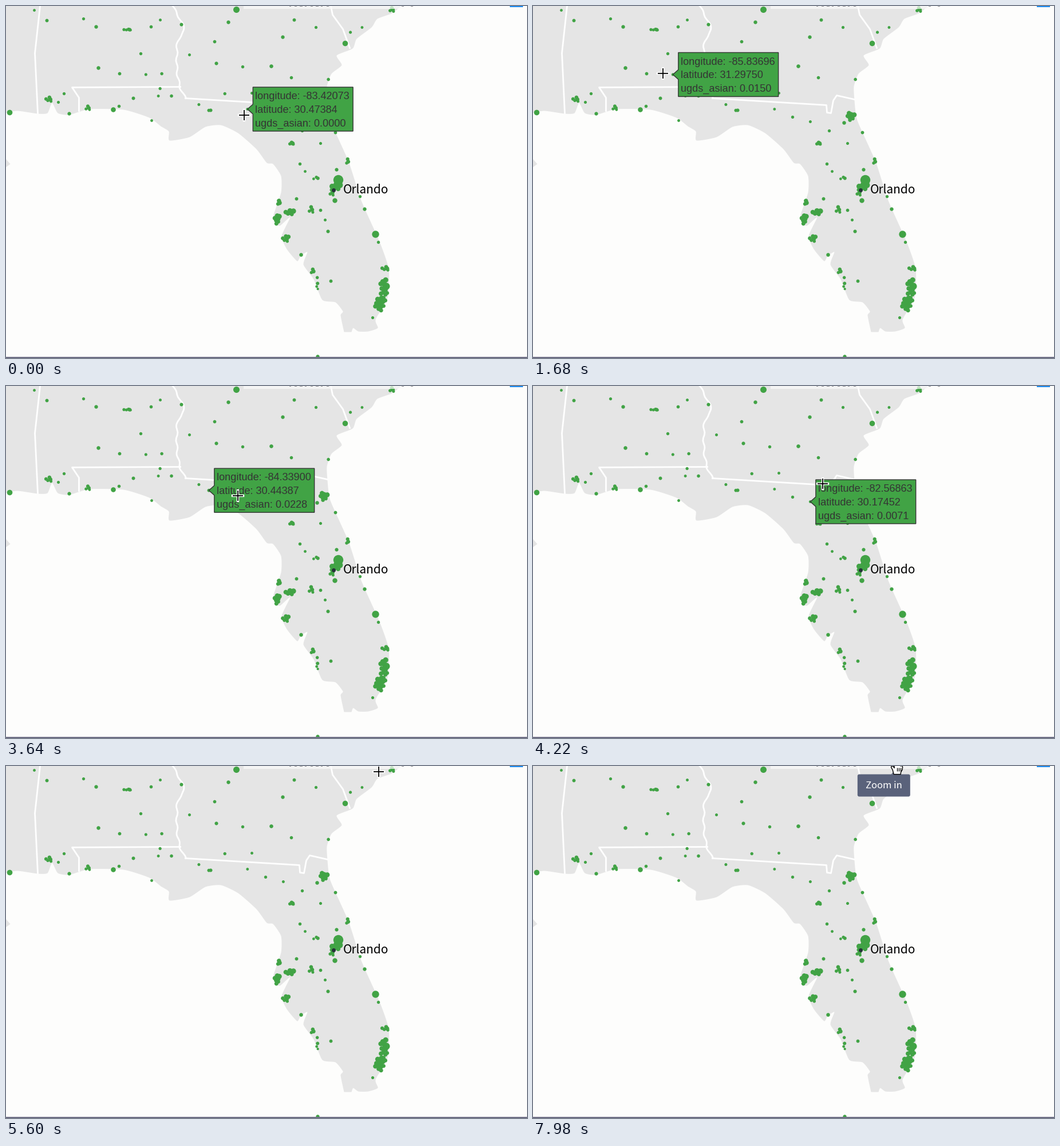
These frames come from a looping animation (910x616 px, 8000 ms). A matplotlib script:

```python
import numpy as np
import matplotlib.pyplot as plt
from matplotlib.animation import FuncAnimation
from matplotlib.patches import FancyBboxPatch, Polygon, Rectangle

W, H, DPI = 910, 616, 100
LOOP, STEP = 8000, 40
PT = 72 / DPI  # points per pixel
GOLDEN = 0.618034

PAPER, LAND = "#fdfdfc", "#e5e5e5"
GREEN, INK, SLATE = "#41a345", "#343434", "#5a627b"
SANS, HUMANIST = "Liberation Sans", "Noto Sans CJK JP"

GULF = [
    (0, 186), (20, 183), (55, 188), (72, 187), (80, 169), (90, 187), (110, 190),
    (145, 180), (205, 181), (250, 195), (270, 210), (284, 219), (285, 235),
    (320, 229), (348, 211), (375, 208), (405, 222), (437, 250), (455, 274),
    (466, 276), (480, 297), (480, 326), (467, 365), (470, 379), (478, 384),
    (496, 369), (481, 402), (490, 425), (508, 446), (514, 437), (526, 430),
    (519, 452), (537, 478), (552, 514), (575, 518), (588, 534), (584, 541),
    (590, 570),
]
ATLANTIC = [
    (603, 570), (606, 563), (615, 569), (632, 569), (649, 563), (645, 548),
    (666, 510), (668, 460), (652, 412), (620, 340), (598, 272), (566, 200),
    (561, 165), (560, 140), (568, 118), (586, 103), (577, 86), (605, 74),
    (612, 57), (638, 37), (648, 22), (672, 13), (690, 0),
]
RIVER = [(291, 0), (311, 40), (299, 62), (298, 110), (303, 140), (313, 161)]
STATE_LINES = [
    [(59, 0), (50, 82), (55, 187)],
    [(304, 141), (115, 142), (127, 160), (127, 183)],
    [(313, 161), (512, 173), (513, 186), (520, 187), (524, 165), (530, 156),
     (561, 163)],
    [(567, 0), (570, 15), (588, 40), (600, 73)],
]

# Urban areas: centre, half width, half height, dots, radius
METROS = [
    (213, 41, 8, 1, 5, 3.2), (75, 163, 6, 5, 5, 3.6), (142, 178, 6, 4, 4, 3.3),
    (673, 6, 6, 4, 4, 3.5), (555, 193, 8, 7, 8, 4.4), (498, 240, 6, 2, 4, 3.6),
    (596, 272, 3, 5, 3, 3.4), (541, 301, 8, 2, 3, 3), (576, 316, 8, 6, 6, 5.6),
    (568, 326, 5, 6, 4, 3.6), (476, 344, 3, 4, 3, 4), (495, 361, 8, 5, 6, 4.8),
    (473, 372, 5, 9, 7, 4.6), (488, 407, 6, 7, 6, 3.9), (532, 356, 6, 6, 4, 3.6),
    (535, 464, 4, 4, 3, 3.5), (543, 485, 2, 13, 4, 3), (663, 459, 7, 4, 5, 3.7),
    (660, 496, 7, 21, 13, 4.9), (652, 521, 9, 12, 12, 4.9),
]
BIG = [(580, 304, 8.7), (645, 399, 6.2), (664, 490, 6), (402, 6, 5.5),
       (6, 186, 4.8), (187, 181, 4.3), (592, 65, 4.8), (574, 340, 4.2)]
TOWNS = [
    (49, 7), (71, 25), (135, 22), (157, 36), (253, 36), (269, 24), (306, 32),
    (235, 83), (161, 108), (198, 118), (91, 168), (110, 188), (197, 175),
    (254, 200), (222, 161), (101, 153), (388, 28), (364, 62), (320, 85),
    (367, 100), (413, 106), (463, 105), (503, 24), (541, 37), (483, 54),
    (498, 125), (429, 152), (357, 182), (517, 218), (543, 204), (575, 221),
    (549, 240), (577, 286), (513, 276), (522, 289), (507, 337), (618, 333),
    (626, 355), (549, 357), (557, 374), (562, 394), (650, 413), (515, 435),
    (567, 481), (640, 545), (544, 613),
]

# Schools along the pointer's way: longitude, latitude, share
SCHOOLS = np.array([
    (-83.42073, 30.47384, 0.0000), (-83.95939, 30.84126, 0.0114),
    (-84.57677, 30.58268, 0.0047), (-85.22806, 30.78677, 0.0061),
    (-85.49943, 30.96364, 0.0052), (-85.54013, 30.78677, 0.0094),
    (-85.45873, 31.31738, 0.0083), (-85.83696, 31.29750, 0.0150),
    (-84.33900, 30.44387, 0.0228), (-82.98925, 30.28371, 0.0102),
    (-82.56863, 30.17452, 0.0071), (-81.49665, 31.18132, 0.0096),
    (-80.97360, 32.30331, 0.0127), (-80.69619, 32.41942, 0.0118),
])
SPOTS = np.column_stack([421.3 + (SCHOOLS[:, 0] + 83.42073) * 73.45,
                         180 - (SCHOOLS[:, 1] - 30.47384) * 73.5])

# Pointer path: ms, x, y
PATH = np.array([
    (0, 418, 192), (1500, 227, 118), (1900, 225, 118), (2700, 238, 126),
    (2940, 255, 145), (3240, 315, 167), (3660, 404, 193), (4050, 480, 190),
    (4600, 562, 130), (5020, 616, 43), (5700, 655, 6), (6100, 704, -4),
    (6420, 679, -5), (7000, 652, -6), (7540, 638, -7), (8000, 632.3, -8),
])
LAG = 120     # labels trail the pointer, ms
REACH = 28    # hover distance, px
BAR_EDGE = 6  # toolbar's lower edge

# Toolbar hints: label, box width
HINTS = [("Zoom in", 92), ("Zoom out", 104), ("Autoscale", 104)]
BUTTON_X, BUTTON_GAP = 633, 33.5

TIP = np.array([(0, 0), (9.5, -8.5), (9.5, -38.5), (184.3, -38.5),
                (184.3, 38.5), (9.5, 38.5), (9.5, 8.5)])
HAND = np.array([
    (-3, 22), (9, 22), (9.5, 18), (12, 14), (12.5, 9), (11, 7), (9, 7.5),
    (7, 6), (5, 6.5), (3, 5.5), (2, 6), (1.7, 0), (0, -1.5), (-2, 0),
    (-2, 11), (-4, 8), (-7, 7.5), (-7.5, 10), (-5, 14),
])

fig = plt.figure(figsize=(W / DPI, H / DPI), dpi=DPI, facecolor=PAPER)
ax = fig.add_axes([0, 0, 1, 1])
ax.set_xlim(-0.5, W - 0.5)
ax.set_ylim(H - 0.5, -0.5)
ax.axis("off")


def smooth(points, n=6):
    """Gentle curve through the points (cardinal spline)."""
    p = np.array(points, float)
    p = np.vstack([p[:1], p, p[-1:]])
    u = np.linspace(0, 1, n, endpoint=False)[:, None]
    parts = []
    for a, b, c, d in zip(p, p[1:], p[2:], p[3:]):
        m0, m1 = (c - a) * 0.3, (d - b) * 0.3
        parts.append((2 * u**3 - 3 * u**2 + 1) * b + (u**3 - 2 * u**2 + u) * m0
                     + (3 * u**2 - 2 * u**3) * c + (u**3 - u**2) * m1)
    return np.vstack(parts + [p[-1:]])


def metro(x, y, rx, ry, n, r):
    """Dots on a sunflower spiral, in mixed sizes."""
    k = np.arange(n)
    reach, angle = np.sqrt((k + 0.5) / n), k * 2.39996
    size = r * (1 - 0.35 * (k * GOLDEN % 1))
    return np.column_stack([x + rx * reach * np.cos(angle),
                            y + ry * reach * np.sin(angle), size])


def rect(x, y, w, h, color, alpha=1):
    ax.add_patch(Rectangle((x, y), w, h, fc=color, lw=0, zorder=6, alpha=alpha))


def label(x, y, text, px, color, font, z, ha="left"):
    return ax.text(x, y, text, fontsize=px * PT, color=color, family=font,
                   ha=ha, va="baseline", zorder=z)


def line(color, px, z, cap="butt"):
    return ax.plot([], [], color=color, lw=px * PT, zorder=z,
                   solid_capstyle=cap)[0]


def with_radius(points, low, spread):
    mix = np.arange(len(points)) * GOLDEN % 1
    return np.column_stack([points, low + spread * mix])


def draw_map():
    coast = np.vstack([smooth(GULF), smooth(ATLANTIC), [(-5, -5), (-5, 186)]])
    ax.add_patch(Polygon(coast, fc=LAND, lw=0, zorder=1))
    ax.add_patch(Polygon([(-1, 267), (7, 276), (-1, 282)], fc=LAND, lw=0,
                         zorder=1))
    river = smooth(RIVER, 12)
    river[:, 0] += 1.5 * np.sin(river[:, 1] / 4)
    for border in [river, *map(np.array, STATE_LINES)]:
        ax.plot(*border.T, color="white", lw=2.8 * PT, zorder=2)
    dots = np.vstack([*(metro(*row) for row in METROS), BIG,
                      with_radius(TOWNS, 2.4, 0.9), with_radius(SPOTS, 2.4, 0.5)])
    ax.scatter(dots[:, 0], dots[:, 1], s=(2 * dots[:, 2] * PT) ** 2, c=GREEN,
               lw=0, zorder=3)
    ax.scatter([571], [322], s=(7 * PT) ** 2, c="#263238", lw=0, zorder=3.5)
    label(588.5, 327.5, "Orlando", 20.8, "black", HUMANIST, 3.5)


def draw_chrome():
    rect(414, -0.5, 276, 5.5, "#fbfbfb", alpha=0.72)
    for k in range(8):
        rect(494 + 9.3 * k, -0.5, 3 + k % 3, 1.3, "#8d8d92")
    for x in (690, 706):
        rect(x, -0.5, 4, 1.3, "#8d8d92")
    rect(879, -0.5, 23, 1.6, "#1e8cf0")
    rect(-0.5, H - 2.3, W, 1.8, "#6f6f86")


draw_map()
draw_chrome()

tip = ax.add_patch(Polygon(TIP, fc=GREEN, ec=INK, lw=1.4 * PT, zorder=5))
tip_lines = [label(0, 0, "", 18.2, INK, SANS, 5.1) for _ in range(3)]
hint_box = ax.add_patch(FancyBboxPatch(
    (0, 14), 90, 39, boxstyle="round,pad=0,rounding_size=3", fc=SLATE, lw=0,
    zorder=7))
hint_arrow = ax.add_patch(Polygon(np.zeros((3, 2)), fc=SLATE, lw=0, zorder=7))
hint_text = label(0, 38.5, "", 16.6, "white", HUMANIST, 7.1, ha="center")
halo = line("white", 4.4, 8, "projecting")
cross = line("black", 1.8, 8.1)
hand = ax.add_patch(Polygon(HAND, fc="white", ec="black", lw=1.4 * PT, zorder=8,
                            joinstyle="round"))
fingers = line("black", 1.3, 8.1)

hover_parts = [tip, *tip_lines]
hint_parts = [hint_box, hint_arrow, hint_text]
cross_parts = [halo, cross]
hand_parts = [hand, fingers]


def show(parts, on):
    for part in parts:
        part.set_visible(on)


def pointer(t):
    """Pointer place at t, with the path's corners rounded in time."""
    span = t + np.linspace(-40, 40, 5)
    return np.array([np.interp(span, PATH[:, 0], PATH[:, k]).mean()
                     for k in (1, 2)])


def place_hover(pos):
    gaps = np.hypot(*(SPOTS - pos).T)
    near = gaps.argmin()
    on = gaps[near] < REACH
    show(hover_parts, on)
    if not on:
        return
    lon, lat, share = SCHOOLS[near]
    x, y = SPOTS[near]
    tip.set_xy(TIP + (x, y))
    words = (f"longitude: {lon:.5f}", f"latitude: {lat:.5f}",
             f"ugds_asian: {share:.4f}")
    for row, (item, text) in enumerate(zip(tip_lines, words), -1):
        item.set_text(text)
        item.set_position((x + 13.3, y + 6.2 + row * 23.66))


def place_hint(pos):
    on = pos[1] < BAR_EDGE
    show(hint_parts, on)
    if not on:
        return
    k = int(np.clip(round((pos[0] - BUTTON_X) / BUTTON_GAP), 0, 2))
    text, width = HINTS[k]
    arrow = BUTTON_X + k * BUTTON_GAP
    left = arrow + 25.3 - width
    hint_box.set_bounds(left, 14, width, 39)
    hint_arrow.set_xy([(arrow - 8, 14.2), (arrow, 6), (arrow + 8, 14.2)])
    hint_text.set_text(text)
    hint_text.set_x(left + width / 2)


def place_pointer(pos):
    over_bar = pos[1] < BAR_EDGE
    show(cross_parts, not over_bar)
    show(hand_parts, over_bar)
    x, y = np.round(pos)
    hand.set_xy(HAND + pos)
    fingers.set_data(np.repeat(x + np.array([2, 5, 8]), 3),
                     np.tile([y + 11, y + 17, np.nan], 3))
    for item in cross_parts:
        item.set_data([x - 9, x + 9, np.nan, x, x], [y, y, np.nan, y - 9, y + 9])


def update(i):
    t = i * STEP + STEP / 2
    late = pointer(t - LAG)
    place_hover(late)
    place_hint(late)
    place_pointer(pointer(t))
    return [*hover_parts, *hint_parts, *cross_parts, *hand_parts]


anim = FuncAnimation(fig, update, frames=LOOP // STEP, interval=STEP,
                     repeat=True, repeat_delay=0)
plt.show()
```
